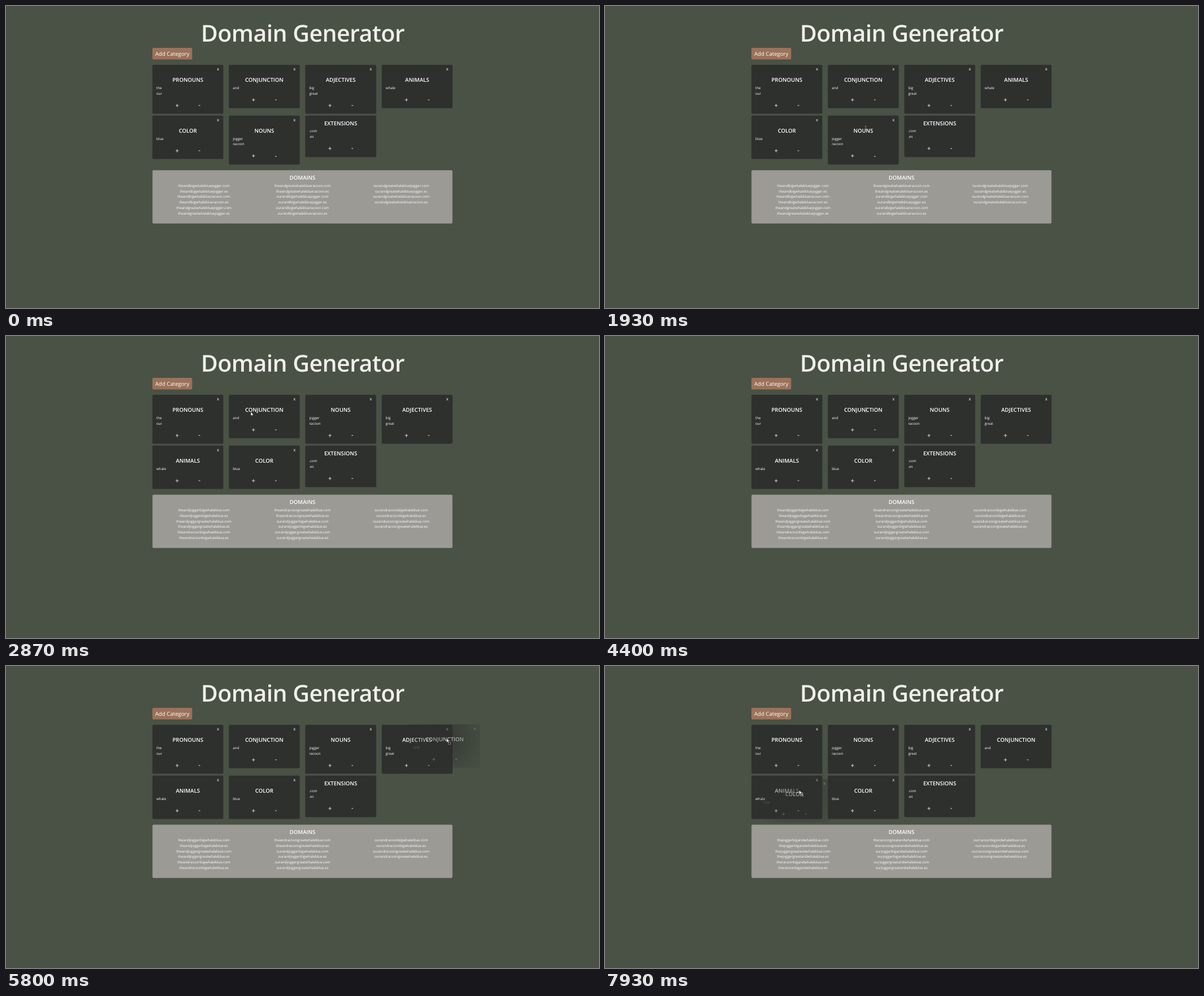
Animation of 1049 by 534 pixels, one loop 8000 ms. Source, as an HTML page:

```html
<!DOCTYPE html>
<html lang="en">
<head>
<meta charset="utf-8">
<title>Domain Generator</title>
<style>
html, body { margin: 0; width: 100%; height: 100%; overflow: hidden; background: #495245; }
svg { display: block; }
text { font: 6.23px "Open Sans", "Noto Sans", sans-serif; fill: #fff; text-rendering: geometricPrecision; }
.mid { text-anchor: middle; }
.title { font-size: 41px; font-weight: 600; letter-spacing: -.53px; fill: #efefe9; }
.head { font-size: 9.6px; font-weight: 600; }
.add { font-size: 9.6px; }
.sign { font-size: 11.5px; }
.close { font-size: 7.8px; }
.card rect { fill: #2e302e; }
.panel rect { fill: #9c9a95; stroke: #8b8984; stroke-width: .4; }
</style>
</head>
<body>
<svg id="stage" width="1049" height="534" viewBox="0 0 1049 534">
  <defs>
    <radialGradient id="fade" gradientUnits="userSpaceOnUse" r="85">
      <stop offset="0" stop-color="#fff" stop-opacity=".68"/>
      <stop offset="1" stop-color="#fff" stop-opacity="0"/>
    </radialGradient>
    <mask id="halo" maskUnits="userSpaceOnUse" x="0" y="0" width="1049" height="534">
      <rect width="1049" height="534" fill="url(#fade)"/>
    </mask>
  </defs>
  <rect width="1049" height="534" fill="#495245"/>
  <text class="title mid" x="524.8" y="63">Domain Generator</text>
  <rect x="259" y="74" width="70.3" height="20.4" rx="2" fill="#9b725a"/>
  <text class="add mid" x="294.2" y="88">Add Category</text>
  <g id="board"></g>
  <g id="ghost"></g>
  <g id="cursor">
    <path id="arrow" d="M0 0V7.2L1.7 5.7 2.8 8.2 3.9 7.7 2.8 5.3H5z" fill="#fff" stroke="#000" stroke-width=".45"/>
    <path id="beam" d="M-1.5 -4.2Q0 -4.2 0 -3.4Q0 -4.2 1.5 -4.2M0 -3.4V3.4M-1.5 4.2Q0 4.2 0 3.4Q0 4.2 1.5 4.2" fill="none" stroke="#b4b5b2" stroke-width=".6"/>
    <rect id="box" x="3.2" y="7.4" width="4" height="3.4" fill="none" stroke="#e8e8e4" stroke-width=".7" stroke-dasharray=".8 .8"/>
  </g>
</svg>
<script>
const LOOP = 8000, STEP = 1000 / 15;
const $ = id => document.getElementById(id);

const words = {
  PRONOUNS: ['the', 'our'], CONJUNCTION: ['and'], ADJECTIVES: ['big', 'great'],
  ANIMALS: ['whale'], COLOR: ['blue'], NOUNS: ['jogger', 'racoon'], EXTENSIONS: ['.com', '.es']
};
const layouts = [
  [0, 'PRONOUNS CONJUNCTION ADJECTIVES ANIMALS COLOR NOUNS EXTENSIONS'],
  [2866, 'PRONOUNS CONJUNCTION NOUNS ADJECTIVES ANIMALS COLOR EXTENSIONS'],
  [5866, 'PRONOUNS NOUNS ADJECTIVES CONJUNCTION ANIMALS COLOR EXTENSIONS']
].map(([from, names]) => ({ from, names: names.split(' ') }));

// start, end, category
const drags = [[2130, 2866, 'NOUNS'], [4590, 5866, 'CONJUNCTION'], [7590, 8001, 'COLOR']];

// time, x, y, pointer shape from here on
const path = [
  [66, 1045, 530, 'arrow'], [330, 441, 146, 'arrow'], [530, 441, 146, 'arrow'],
  [800, 505, 150, 'arrow'], [1060, 577, 129, 'beam'], [1133, 579, 126.5, 'beam'],
  [1200, 565, 134, 'arrow'], [1333, 490, 150, 'arrow'], [1800, 461, 216.5, 'beam'],
  [2130, 461, 216.5, 'arrow'], [2200, 459, 207, 'arrow'], [2400, 437, 154.5, 'arrow'],
  [2667, 433, 134, 'arrow'], [2867, 433, 134, 'arrow'], [3670, 722, 158, 'arrow'],
  [4330, 462, 131, 'beam'], [4590, 460.5, 129, 'arrow'], [4800, 436, 149, 'arrow'],
  [5067, 436, 149, 'arrow'], [5800, 779.5, 128, 'arrow'], [6200, 779.5, 128, 'arrow'],
  [6800, 551, 239, 'arrow'], [7200, 551, 239, 'arrow'], [7500, 465.5, 213.5, 'beam'],
  [7590, 465.5, 213.5, 'arrow'], [7930, 343.5, 219.5, 'arrow'], [8001, 343.5, 219.5, 'arrow']
];

const label = (x, y, str, cls = '') => `<text class="${cls}" x="${x}" y="${y}">${str}</text>`;
const block = (x, y, w, h) => `<rect x="${x}" y="${y}" width="${w}" height="${h}" rx="2"/>`;

function cardBox(i, name) {
  const fixed = name === 'EXTENSIONS';
  return {
    x: 259 + i % 4 * 135.2, y: i < 4 ? 104 : 193.8, fixed,
    h: (fixed ? 53.8 : 66.9) + 9.83 * words[name].length
  };
}

function card(i, name) {
  const { x, y, h, fixed } = cardBox(i, name), top = fixed ? y - 13.2 : y;
  return '<g class="card">' + block(x, y, 125.4, h) +
    (fixed ? '' : label(x + 116, y + 10, 'x', 'close mid')) +
    label(x + 62.7, top + 29.9, name, 'head mid') +
    words[name].map((w, k) => label(x + 7, top + 42.8 + k * 9.83, w)).join('') +
    label(x + 43.7, y + h - 11, '+', 'sign mid') +
    label(x + 83.2, y + h - 11.8, '-', 'sign mid') + '</g>';
}

function panel(names) {
  const bottom = Math.max(...names.map((n, i) => { const b = cardBox(i, n); return b.y + b.h; }));
  const y = bottom + 10.1;
  const domains = names.reduce((all, n) => all.flatMap(a => words[n].map(w => a + w)), ['']);
  return '<g class="panel">' + block(259.2, y, 530.5, 94) + label(524.5, y + 16.4, 'DOMAINS', 'head mid') +
    domains.map((d, k) =>
      label(350 + Math.floor(k / 6) * 174.5, y + 29.3 + k % 6 * 9.83, d, 'mid')).join('') + '</g>';
}

function pointer(t) {
  const i = path.findLastIndex(p => p[0] <= t);
  if (i < 0) return null;
  const [t0, x0, y0, shape] = path[i], [t1, x1, y1] = path[i + 1];
  const u = (t - t0) / (t1 - t0), e = u * u * (3 - 2 * u);
  return { x: x0 + (x1 - x0) * e, y: y0 + (y1 - y0) * e, shape };
}

let shown, held;
function draw(now) {
  const t = Math.floor((now % LOOP + 4) / STEP) * STEP % LOOP;
  const layout = layouts.findLast(l => l.from <= t);
  if (layout !== shown) {
    shown = layout;
    $('board').innerHTML = layout.names.map((n, i) => card(i, n)).join('') + panel(layout.names);
  }

  const p = pointer(t), drag = drags.find(d => t >= d[0] && t < d[1]);
  if (drag !== held) {
    held = drag;
    $('ghost').innerHTML = drag
      ? `<g mask="url(#halo)"><g id="copy">${card(layout.names.indexOf(drag[2]), drag[2])}</g></g>` : '';
  }
  if (drag) {
    const grip = pointer(drag[0]);
    $('copy').setAttribute('transform', `translate(${p.x - grip.x} ${p.y - grip.y})`);
    $('fade').setAttribute('cx', p.x);
    $('fade').setAttribute('cy', p.y);
  }

  $('cursor').style.display = p ? '' : 'none';
  if (p) {
    $('cursor').setAttribute('transform', `translate(${p.x} ${p.y})`);
    $('arrow').style.display = p.shape === 'arrow' ? '' : 'none';
    $('beam').style.display = p.shape === 'beam' ? '' : 'none';
    $('box').style.display = drag ? '' : 'none';
  }
}

const start = performance.now();
function tick() {
  draw(performance.now() - start);
  requestAnimationFrame(tick);
}
tick();
</script>
</body>
</html>
```
